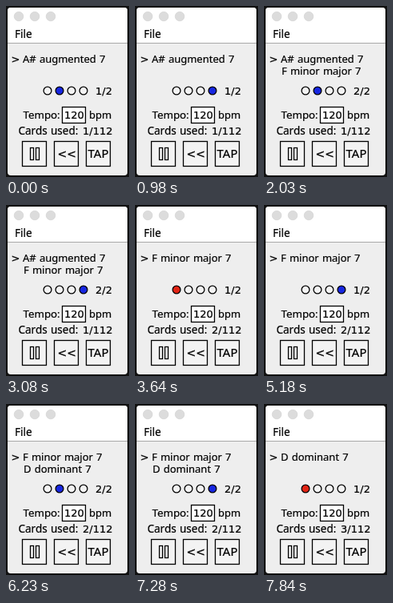
These frames come from a looping animation (154 px wide and 214 px high, 8000 ms). An HTML page:

```html
<!DOCTYPE html>
<html lang="en">
<head>
<meta charset="utf-8">
<title>Chord practice</title>
<style>
  html, body { margin: 0; width: 100%; height: 100%; overflow: hidden; background: #111; }
  svg { display: block; width: 100vw; height: 100vh; }
  text { font: 13px "Noto Sans", "Open Sans", sans-serif; word-spacing: .8px; white-space: pre;
    fill: #000; stroke: #000; stroke-width: .2; }
  .wide { font-family: "DejaVu Sans", sans-serif; }
  .line { stroke: #000; stroke-width: 1.3; }
</style>
</head>
<body>
<svg id="stage" viewBox="0 0 154 214"></svg>
<script>
const LOOP = 8000;
const BEATS = [420, 980, 1540, 2030, 2590, 3080, 3640, 4130, 4690, 5180, 5740, 6230, 6790, 7280, 7840];
const CHORDS = ["A# augmented 7", "F minor major 7", "D dominant 7"];
const stage = document.getElementById("stage");

function add(tag, attrs, content = "") {
  const node = document.createElementNS("http://www.w3.org/2000/svg", tag);
  for (const key in attrs) node.setAttribute(key, attrs[key]);
  node.textContent = content;
  return stage.appendChild(node);
}
const box = (x, y, width, height, attrs) => add("rect", { x, y, width, height, ...attrs });
const label = (x, y, content, size = 13) => add("text", { x, y, style: `font-size: ${size}px` }, content);
const wide = (x, y, content, size = 13) =>
  add("text", { x, y, class: "wide", style: `font-size: ${size}px` }, content);

// Window, title bar and menu
box(2, 2, 150, 210, { rx: 4, fill: "#eee" });
add("path", { d: "M2 46V6q0-4 4-4h142q4 0 4 4v40z", fill: "#fff" });
for (const cx of [16, 36, 56]) {
  add("circle", { cx, cy: 13, r: 5.8, fill: "#dcdcdc", stroke: "#cfcfcf", "stroke-width": .6 });
}
box(2, 46, 150, 1, { fill: "#a8a8a8" });
label(11, 40, "File", 13.5);

// Chords and beat indicator
wide(6.5, 71, ">");
const current = label(21, 71, "");
const upcoming = label(22, 86, "");
const dots = [52, 67, 82, 97].map(cx => add("circle", { cx, cy: 106, r: 4.9, class: "line" }));
const bar = wide(112, 111, "");

// Tempo and progress
label(21.5, 141, "Tempo:", 13.3);
box(70.5, 126.5, 29, 20, { fill: "#fff", class: "line" });
wide(73, 141, "120");
label(104, 141, "bpm");
label(15.5, 161, "Cards used:", 13.5);
const used = wide(96, 161, "");

// Buttons
for (const x of [20.5, 60.5, 100.5]) box(x, 169.5, 30, 31, { fill: "#f3f3f3", class: "line" });
for (const x of [30.5, 37.5]) box(x, 177.5, 4, 15, { fill: "none", class: "line" });
wide(64.5, 190, "<<", 14);
label(102.5, 190, "TAP", 15);

function draw(time) {
  const beat = 1 + BEATS.filter(at => at <= time).length;
  const dot = beat % 4;
  const measure = Math.floor(beat / 4);
  const card = measure >> 1;
  const second = measure % 2;

  current.textContent = CHORDS[card];
  upcoming.textContent = second ? CHORDS[card + 1] : "";
  bar.textContent = `${second + 1}/2`;
  used.textContent = `${card + 1}/112`;
  dots.forEach((node, i) =>
    node.setAttribute("fill", i !== dot ? "#f3f3f3" : dot ? "#1626e0" : "#e02414"));
}

const start = performance.now();
function tick() {
  draw((performance.now() - start) % LOOP);
  requestAnimationFrame(tick);
}
draw(0);
requestAnimationFrame(tick);
</script>
</body>
</html>
```
